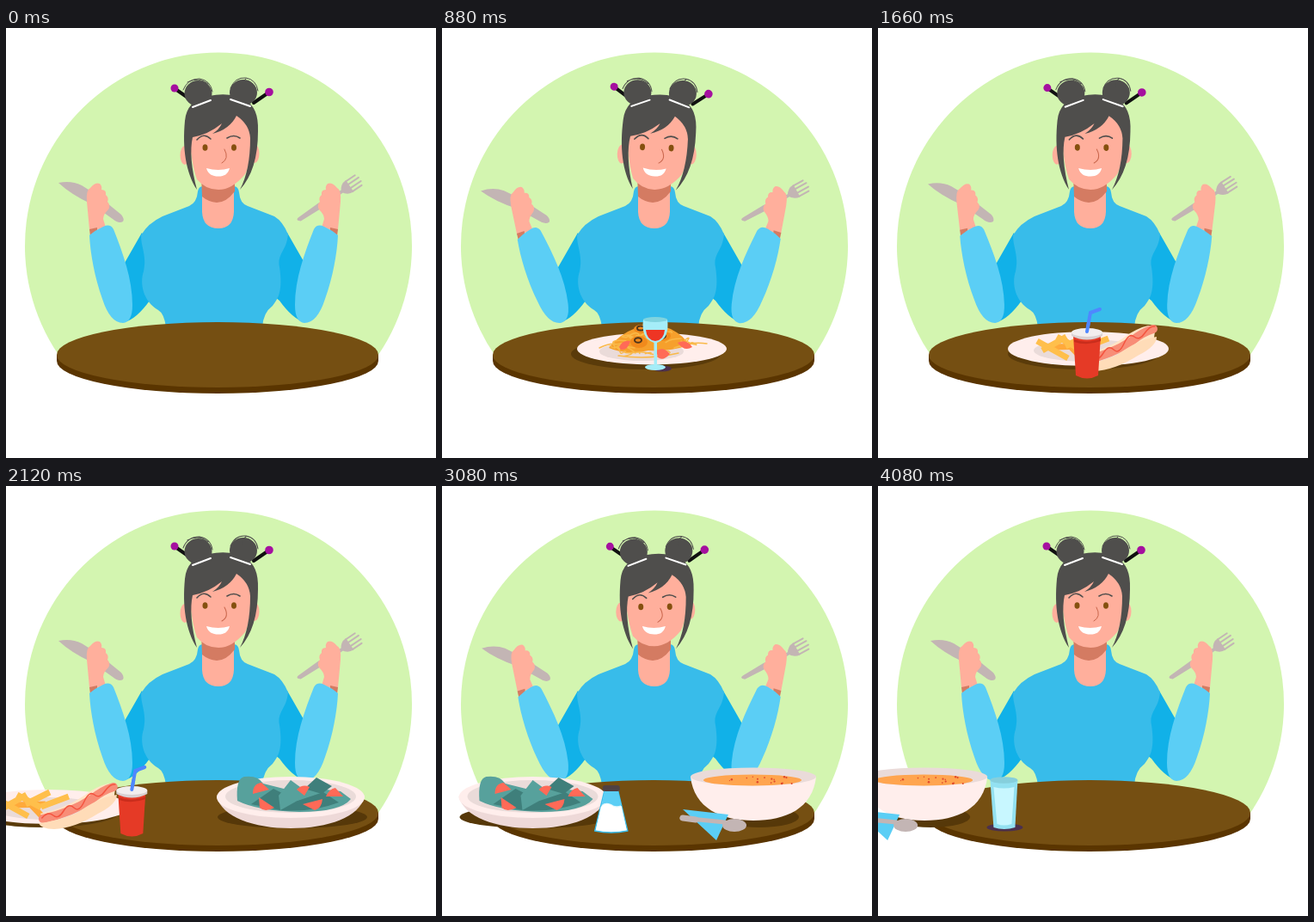
Write an HTML page that moves like this. It is 500 by 500 pixels and loops after 4.1 s.

```html
<!DOCTYPE html>
<html lang="en">
<head>
<meta charset="utf-8">
<title>Dinner</title>
<style>
html, body { margin: 0; height: 100%; overflow: hidden; background: #fff }
svg { display: block; width: 100vw; height: 100vh }
.line { fill: none; stroke-linecap: round }
</style>
</head>
<body>
<svg viewBox="0 0 500 500">
  <defs>
    <g id="sleeve">
      <path fill="#d47b62" d="M97 234L106 232V238L98 242Z"/>
      <path fill="#5bcef5" d="M97 241Q104 235 113 231Q121 227 125 234C136 262 147 292 147 322Q147 342 136 343Q121 343 112 315C103 290 98 262 97 241Z"/>
    </g>
    <path id="hand" fill="#ffaf9c" d="M97 234L94 202Q93 188 98 186Q104 179 109 181Q112 184 111 188Q117 188 116 194Q120 197 118 202Q122 206 119 211Q113 217 113 222L116 232Q106 235 98 235Z"/>
    <path id="upper" fill="#11b1e8" d="M158 238L130 287L138 342Q152 338 167 317L182 305L164 250Z"/>
  </defs>

  <path fill="#d3f5b0" d="M61 380A225 225 0 1 1 433 380Z"/>

  <use href="#upper"/>
  <use href="#upper" transform="translate(485) scale(-1 1)"/>
  <path fill="#38bcea" d="M223 190Q224 184 229 184H265Q270 184 271 191Q272 204 281 207L312 219Q322 225 328 240C326 260 315 262 318 278C322 305 317 314 310 323Q299 331 298 348H186Q184 332 177 328C160 318 155 298 160 283C164 265 157 255 157 241Q165 227 182 219L213 207Q222 203 223 190Z"/>
  <path fill="#ffaf9c" d="M228 172H265V214Q264 233 247 233Q229 233 228 214Z"/>
  <path fill="#d47b62" d="M227 170H266V190Q256 203 245 203Q235 202 228 196Z"/>

  <g id="head">
    <g id="skin" fill="#ffaf9c">
      <ellipse cx="208" cy="148" rx="5.5" ry="11"/>
      <ellipse cx="289" cy="146" rx="5.5" ry="11"/>
      <path d="M213 108L286 100Q288 150 278 170Q263 188 247 188Q232 188 222 176Q213 150 213 108Z"/>
    </g>
    <path class="line" stroke="#111" stroke-width="4" d="M210 80L197 71M288 87L304 76"/>
    <circle cx="196" cy="70" r="4.5" fill="#a5109f"/>
    <circle cx="306" cy="74.5" r="4.800" fill="#a5109f"/>
    <g id="face">
      <path fill="#4f4e4c" d="M222 188C209 168 205 140 208 108Q210 84 236 79Q262 74 278 84Q294 92 293 120Q293 165 272 188Q284 165 284 128Q283 112 268 102Q260 118 240 123Q248 118 251 111Q235 124 217 127Q212 150 222 188Z"/>
      <path class="line" stroke="#4f4e4c" stroke-width="1.600" d="M222 130Q230 121 238 129M257 128Q265 123 272 128"/>
      <path class="line" stroke="#c9664c" d="M254 141Q260 152 251 157"/>
      <g id="open" fill="#85500f">
        <ellipse cx="231.500" cy="139" rx="3" ry="3.800"/>
        <ellipse cx="265" cy="139" rx="3" ry="3.800"/>
      </g>
      <path id="shut" class="line" stroke="#e08a75" d="M228 139Q232 142 235 139M261 139Q265 142 269 139"/>
    </g>
    <g id="buns">
      <g fill="#4f4e4c">
        <ellipse cx="223.500" cy="76" rx="16" ry="15"/>
        <ellipse cx="276" cy="75" rx="16" ry="15"/>
      </g>
      <path class="line" stroke="#4f4e4c" d="M206 72Q211 59 225 59Q238 61 240 74M211 63Q224 56 235 65M261 70Q266 57 279 58Q291 60 293 73M275 69Q275 61 279 59"/>
      <path class="line" stroke="#fff" stroke-width="2" d="M217 92L238 84M261 83L284 91"/>
    </g>
    <path fill="#fff" d="M233 163Q247 167 260 163C258 170 254 172.500 247 172.500C240 172.500 235 170 233 163Z"/>
  </g>

  <g id="left">
    <path fill="#c3b5b4" d="M61 180Q76 177 88 183L107 195L134 217Q138 222 136 225Q131 228 124 222L100 205Q76 194 61 180Z"/>
    <use href="#hand"/>
    <use href="#sleeve"/>
  </g>
  <g id="right">
    <g transform="translate(340 224) rotate(-34)" fill="#c3b5b4">
      <path d="M0 0Q-2 -3 3 -3L30 -4L62 -1.500V2L30 3L2 2Z"/>
      <path d="M60 0Q64 -8 72 -8V8Q64 8 60 0Z"/>
      <path class="line" stroke="#c3b5b4" stroke-width="2" d="M71 -7H84M71 -2.500H86M71 2.500H86M71 7H84"/>
    </g>
    <g transform="translate(483) scale(-1 1)">
      <use href="#hand"/>
      <use href="#sleeve"/>
    </g>
  </g>

  <path fill="#5a3500" d="M59 380V387A187 38 0 0 0 433 387V380Z"/>
  <ellipse cx="246" cy="380" rx="187" ry="38" fill="#754f12"/>

  <!-- spaghetti and wine -->
  <g class="plate">
    <ellipse cx="237" cy="379" rx="87" ry="18" fill="#5a3b0a"/>
    <ellipse cx="244" cy="373" rx="87" ry="18.500" fill="#ffeeec"/>
    <ellipse cx="232" cy="376" rx="49" ry="11" fill="#eadbd9"/>
    <path fill="#f6a02c" d="M194 372Q206 356 225 349Q246 342 266 350Q282 358 287 369Q262 377 240 375Q215 381 194 372Z"/>
    <path id="noodles" class="line" stroke="#f9b949" stroke-width="1.500"/>
    <g fill="#f18a1c">
      <ellipse cx="232" cy="350" rx="9" ry="5"/>
      <ellipse cx="229" cy="365" rx="10" ry="7"/>
      <ellipse cx="256" cy="358" rx="10" ry="6"/>
    </g>
    <g fill="none" stroke="#50361b" stroke-width="2">
      <ellipse cx="231" cy="349" rx="4" ry="2.500"/>
      <ellipse cx="228" cy="363" rx="4" ry="2.800"/>
      <ellipse cx="256" cy="358" rx="4" ry="2.800"/>
    </g>
    <path fill="#ff6a57" d="M206 371Q210 362 219 364Q216 375 208 374ZM274 366Q284 361 291 371Q282 377 274 366ZM249 375Q258 370 265 379Q257 388 251 383Z"/>
  </g>
  <g class="drink">
    <ellipse cx="256" cy="396" rx="11" ry="3.500" fill="#4b304d"/>
    <ellipse cx="248" cy="394.500" rx="12" ry="3.500" fill="#a5edf8"/>
    <path fill="#a5edf8" d="M234 339H262Q265 361 250 366V393H246.500V366Q231 361 234 339Z"/>
    <path fill="#ee3524" d="M237 351H259Q258 363 248 364Q238 363 237 351Z"/>
    <ellipse cx="248" cy="339" rx="14" ry="3" fill="#80d4df"/>
  </g>

  <!-- hot dog and soda -->
  <g class="plate"><g transform="translate(-47)">
    <ellipse cx="286" cy="379" rx="88" ry="18" fill="#5a3b0a"/>
    <ellipse cx="291.500" cy="373" rx="93.500" ry="20" fill="#ffeeec"/>
    <ellipse cx="291" cy="375" rx="63" ry="13" fill="#eadbd9"/>
    <g fill="none" stroke-width="7">
      <path stroke="#ffa93a" d="M249 371L288 370M262 361L284 384"/>
      <path stroke="#ffbf4b" d="M232 364L268 384M238 375L266 359M265 370L293 356M283 373L315 361M255 359L283 374"/>
    </g>
    <path fill="#ffe4c6" d="M282 381Q315 374 340 355Q358 344 370 346L368 360L290 393Z"/>
    <path class="line" stroke="#f88d77" stroke-width="10" d="M285 387Q318 380 342 364Q354 354 367 350"/>
    <path class="line" stroke="#f4543f" stroke-width="1.500" d="M284 386Q291 378 297 383T309 378T321 374T333 367T345 359T357 355T369 347"/>
    <path fill="#ffdcb8" d="M280 392Q302 390 325 380Q350 362 371 359Q371 370 349 381Q322 398 298 399Q283 399 280 392Z"/>
  </g></g>
  <g class="drink"><g transform="translate(98)">
    <path class="line" stroke="#4f87ff" stroke-width="4" d="M145 353L149 331L160 327"/>
    <path fill="#e53a26" d="M129 357L132 404Q145 411 158 404L161 357Z"/>
    <path fill="#c92d1c" d="M130 362Q145 368 161 361V364Q145 370 130 365Z"/>
    <path fill="#d8d1d2" d="M127 354V358Q145 367 163 358V354Z"/>
    <ellipse cx="145" cy="354" rx="18" ry="5" fill="#f2eeee"/>
    <path class="line" stroke="#4f87ff" stroke-width="4" d="M145 353L147 342"/>
  </g></g>

  <!-- salad and salt -->
  <g class="plate">
    <ellipse cx="240" cy="385" rx="87" ry="13" fill="#563809"/>
    <path fill="#eed9d8" d="M152 361C158 385 195 398 238 398C282 398 318 385 324 361Z"/>
    <ellipse cx="238" cy="362" rx="86" ry="24" fill="#ffeeec"/>
    <ellipse cx="238" cy="361" rx="76" ry="19" fill="#eadbd9"/>
    <path fill="#57a19c" d="M176 366Q174 340 184 338Q200 336 206 346L230 352L262 351L296 355L308 364Q296 379 248 379Q200 378 176 366Z"/>
    <path fill="#3f7f7b" d="M192 370L218 352L246 366L276 356L294 368Q262 380 226 377Z"/>
    <path fill="#57a19c" d="M226 377L224 360L238 342L260 358Z"/>
    <path fill="#3f7f7b" d="M254 352L268 339L286 349L274 358Z"/>
    <path fill="#ff6a57" d="M194 358Q194 346 204 345L213 353ZM201 362L219 374Q208 380 202 374ZM245 353Q252 346 260 350L254 360ZM279 361Q283 352 290 351L299 361ZM252 370L275 364Q274 375 266 377Z"/>
  </g>
  <g class="drink">
    <path fill="#dff6fd" stroke="#3bbdea" stroke-width="1.500" d="M259 355H275L286 401Q267 405 248 401Z"/>
    <path fill="#5bcef5" d="M259 355H275L279 371Q272 374 267 370Q260 367 256 371Z"/>
    <path fill="#fff" d="M255 373Q261 367 267 371Q273 376 279 372L285 400Q267 404 249 400Z"/>
    <rect x="257" y="348" width="20" height="7" rx="3" fill="#4f4144"/>
  </g>

  <!-- soup and water -->
  <g class="plate">
    <ellipse cx="244" cy="385" rx="46" ry="12" fill="#563809"/>
    <path fill="#ffeeec" d="M164 338C168 375 200 389 237 389C275 389 306 375 310 338Z"/>
    <ellipse cx="237" cy="338" rx="73" ry="10.500" fill="#eadbd9"/>
    <ellipse cx="236" cy="342" rx="57" ry="6.500" fill="#ffa54f"/>
    <g id="spice" fill="#e0492c"/>
    <path fill="#5bcef5" d="M155 376L208 382L194 412Z"/>
    <path class="line" stroke="#c3b5b4" stroke-width="5" d="M154 386L204 391"/>
    <path class="line" stroke="#c3b5b4" stroke-width="7" d="M155 386L170 388"/>
    <ellipse cx="215" cy="394.500" rx="14" ry="7.500" fill="#c3b5b4"/>
  </g>
  <g class="drink">
    <ellipse cx="239" cy="397" rx="21" ry="4.500" fill="#4b304d"/>
    <path fill="#93e1f1" d="M222 342L226 397Q238 401 251 397L254 342Z"/>
    <path fill="#c8f7ff" d="M226 350Q238 353 250 350L247 393Q238 396 230 393Z"/>
    <ellipse cx="238" cy="342" rx="16" ry="3.800" fill="#86cfdc"/>
  </g>
</svg>
<script>
const LOOP = 4100, BEAT = 982, POSE = 2040;
const $ = id => document.getElementById(id);
const move = (el, value) => el.setAttribute('transform', value);
const clamp = v => Math.min(1, Math.max(0, v));
const ease = (a, b, t) => { const u = clamp((t - a) / (b - a)); return u * u * (3 - 2 * u) };

let seed = 7;
const rand = (a, b) => a + (b - a) * ((seed = seed * 16807 % 2147483647) / 2147483647);

let strands = '';
for (let i = 0; i < 26; i++) {
  const a = rand(0, 6.3), x = 243 + 44 * Math.cos(a), y = 368 + 11 * Math.sin(a);
  strands += `M${x} ${y}q${rand(-15, 15)} ${rand(-9, 9)} ${rand(-18, 18)} ${rand(-4, 5)}`;
}
$('noodles').setAttribute('d', strands + 'M183 372Q205 360 225 378M270 372Q290 364 308 367M205 381Q240 386 275 378');

let dots = '';
for (let i = 0; i < 16; i++)
  dots += `<circle cx="${rand(190, 283)}" cy="${rand(338, 346)}" r="${rand(.6, 1.3)}"/>`;
$('spice').innerHTML = dots;

const plates = document.querySelectorAll('.plate');
const drinks = document.querySelectorAll('.drink');

// Decelerate in from the right, accelerate out to the left.
function slide(el, t, far, enter, leave, pull) {
  const left = 1 - clamp((t - enter) / 270), gone = Math.max(0, t - leave) / 150;
  move(el, `translate(${far * left * left - pull * gone * gone})`);
}

function draw(now) {
  const t = now % LOOP, p = t % POSE;

  move($('left'), `rotate(${-6.5 * (ease(80, 540, p) - ease(860, 1960, p))} 136 325)`);
  move($('right'), `rotate(${5.1 * (ease(80, 610, p) - ease(1080, 1980, p))} 345 330)`);

  const tilt = 4.2 * ease(80, 460, p) - .6 * ease(500, 720, p) - 4.6 * ease(720, 1140, p)
    + 1.8 * ease(1180, 1380, p) - .8 * ease(1400, 1960, p);
  const nod = ease(980, 1180, p) - ease(1180, 1375, p);
  move($('head'), `rotate(${tilt} 249 182)`);
  move($('face'), `translate(0 ${6 * nod})`);
  move($('buns'), `translate(0 ${3 * nod})`);
  move($('skin'), `translate(0 ${-8 * nod})`);

  const blink = p > 360 && p < 490;
  $('open').style.display = blink ? 'none' : '';
  $('shut').style.display = blink ? '' : 'none';

  plates.forEach((el, i) => slide(el, t, 356, 25 + BEAT * i, 1014 + BEAT * i, 281));
  drinks.forEach((el, i) => slide(el, t, 310, 170 + BEAT * i, 990 + BEAT * i, 98));
}

const start = performance.now();
(function tick() {
  draw(performance.now() - start);
  requestAnimationFrame(tick);
})();
</script>
</body>
</html>
```
